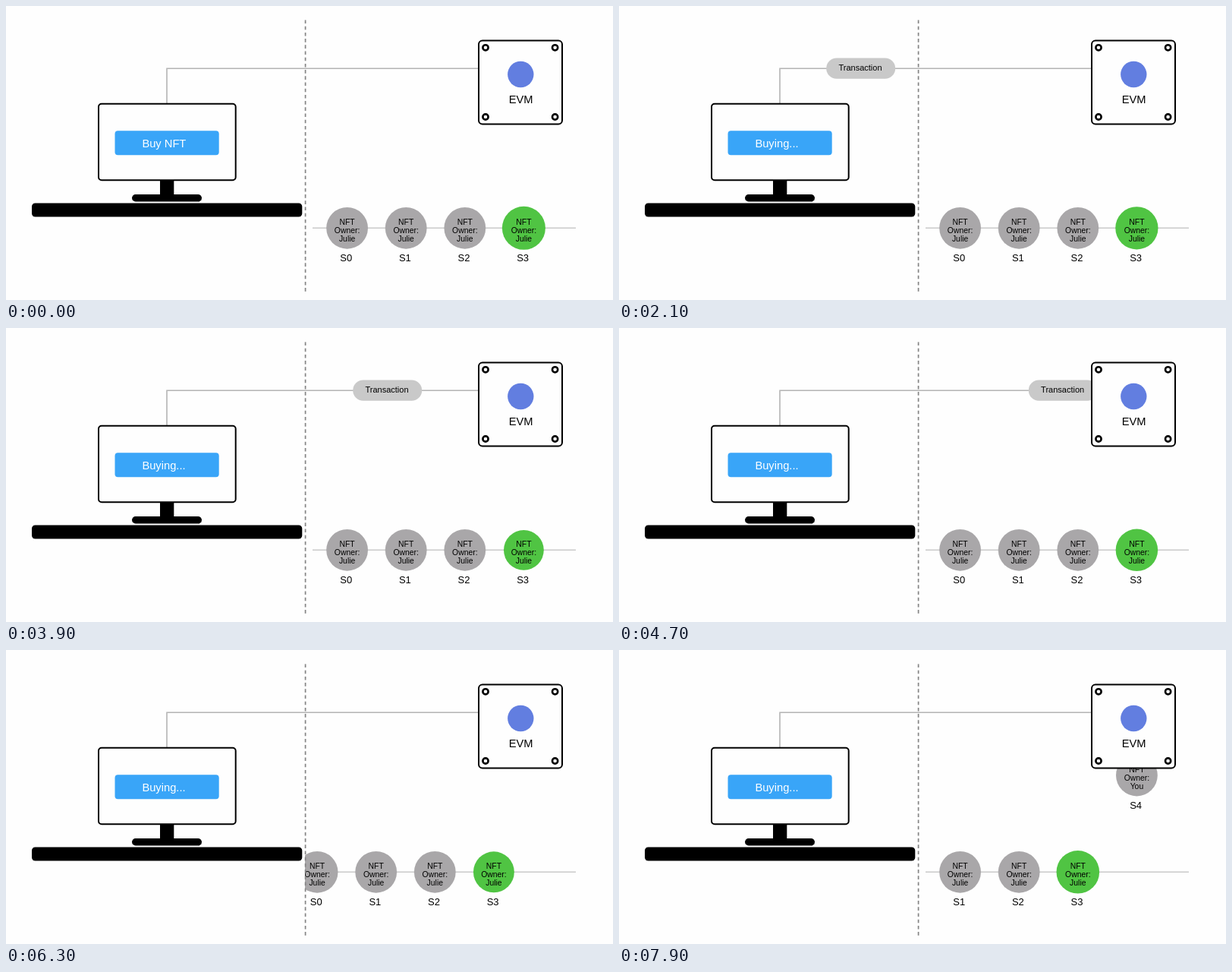
Write an HTML page that moves like this. It is 800 px wide and 387 px high and loops after 8 s.

```html
<!DOCTYPE html>
<html lang="en">
<head>
<meta charset="utf-8">
<title>Buying an NFT</title>
<style>
html, body { margin: 0; width: 100%; height: 100%; overflow: hidden; background: #fefefe; }
svg { display: block; width: 800px; height: 387px; font-family: "Liberation Sans", Arial, sans-serif; }
.mid { text-anchor: middle; }
.box { fill: #fefefe; stroke: #000; stroke-width: 2; }
.owner { font-size: 10.4px; }
.label { font-size: 13px; }
</style>
</head>
<body>
<svg viewBox="0 0 800 387">
  <clipPath id="right"><rect x="394" width="406" height="387"/></clipPath>

  <path d="M212 129V82.3H623" fill="none" stroke="#b4b4b4" stroke-width="1.6"/>
  <g id="pill">
    <rect x="-45.5" y="-13.6" width="91" height="27.2" rx="13.6" fill="#c9c9c9"/>
    <text class="mid" x="-.7" y="2.9" font-size="11">Transaction</text>
  </g>

  <path d="M404 292.3H751" stroke="#cacaca" stroke-width="1.6"/>
  <g clip-path="url(#right)"><g id="row"></g></g>
  <g id="fresh"></g>

  <rect class="box" x="122" y="128.7" width="180.7" height="100.6" rx="4"/>
  <rect x="143.5" y="164.3" width="137.2" height="32" rx="4" fill="#39a5f8"/>
  <text id="button" x="179.4" y="185.6" font-size="14.7" fill="#fff"></text>
  <rect x="203" y="229" width="18.3" height="21"/>
  <rect x="166" y="248" width="92" height="9.5" rx="4.7"/>
  <rect x="34" y="259.4" width="356.3" height="18.2" rx="4.5"/>

  <rect class="box" x="623" y="45.4" width="110" height="110" rx="5"/>
  <g id="screws" fill="#fefefe" stroke="#000" stroke-width="2.6"></g>
  <circle cx="678.3" cy="90" r="17.2" fill="#627ee0"/>
  <text class="mid" x="678.7" y="128" font-size="14.7">EVM</text>

  <path d="M394.6 18.5V379" stroke="#848484" stroke-width="1.7" stroke-dasharray="4.6 3.6"/>
</svg>
<script>
const $ = id => document.getElementById(id);
const GAP = 77.6, FIRST = 449.6, ROW_Y = 292.3;

const state = (n, owner, fill) => `<g id="s${n}">
  <circle r="27.4" fill="${fill}"/>
  <g class="mid owner">${["NFT", "Owner:", owner].map((line, i) =>
    `<text y="${-4.2 + i * 11}">${line}</text>`).join("")}</g>
  <text class="mid label" x="-1.3" y="43.7">S${n}</text></g>`;

const place = (id, x, y) => $(id).setAttribute("transform", `translate(${x} ${y})`);

$("row").innerHTML = [0, 1, 2, 3].map(n => state(n, "Julie", n < 3 ? "#a9a7a9" : "#50c443")).join("");
$("fresh").innerHTML = state(4, "You", "#a9a7a9");
$("screws").innerHTML = [632, 723.6].flatMap(x => [54.8, 146].map(y =>
  `<circle cx="${x}" cy="${y}" r="3.6"/>`)).join("");

// Pill distance along the cable, measured from its corner: [ms, px]
const travel = [[0, -95], [900, -4.5], [1400, 36.5], [2900, 186.5], [3900, 290.5], [5600, 466], [8000, 466]];
function along(t) {
  const i = travel.findIndex(([ms]) => ms > t);
  const [t0, a] = travel[i - 1], [t1, b] = travel[i];
  return a + (b - a) * (t - t0) / (t1 - t0);
}

function draw(t) {
  const s = along(t);
  place("pill", 212.2 + Math.max(s, 0), 82.2 - Math.min(s, 0));
  $("button").textContent = t < 100 ? "Buy NFT" : "Buying...";

  const shift = Math.min(GAP, Math.max(0, (t - 5510) * .05));
  for (let n = 0; n < 4; n++) place("s" + n, FIRST + n * GAP - shift, ROW_Y);
  $("s0").style.display = shift < GAP ? "" : "none";
  place("s4", FIRST + 3 * GAP, Math.max(100, 165 + (t - 7900) * .05));

  const pulse = Math.cos((t - 66) / 1100 * 2 * Math.PI);
  $("s3").firstElementChild.setAttribute("r", 27.5 + 1.1 * pulse);
}

const start = performance.now();
function tick() {
  // Ten steps per second
  draw(Math.floor((performance.now() - start) % 8000 / 100) * 100);
  requestAnimationFrame(tick);
}
tick();
</script>
</body>
</html>
```
